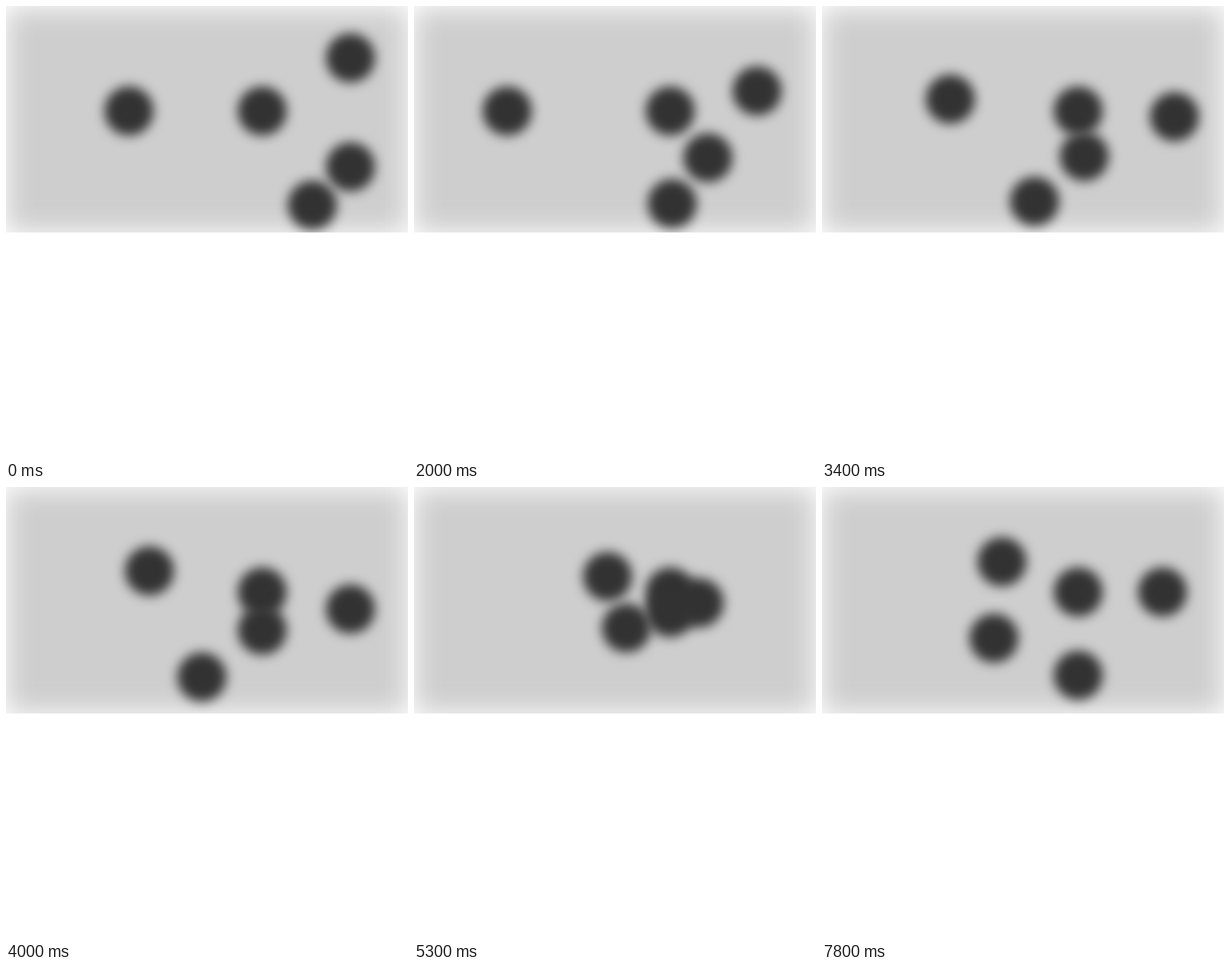
Animation, 706 px wide and 794 px high, one loop 7.9 s. Source, as an HTML page with a canvas:

```html
<!DOCTYPE html>
<html lang="en">
<head>
<meta charset="utf-8">
<title>Drifting blobs</title>
<style>
  html, body { margin: 0; width: 100%; height: 100%; overflow: hidden; background: #fff; }
  canvas { display: block; }
</style>
</head>
<body>
<canvas id="stage" width="706" height="794"></canvas>
<script>
const LOOP = 7900, STEP = 100, W = 706, H = 794, PANEL_H = 397;
const HOME = [450, 184], BURST_END = 7800;
const RADIUS = 43, BLUR = 10, PAD = 80;

const ctx = document.getElementById('stage').getContext('2d');

function layer(w, h, paint) {
  const c = document.createElement('canvas');
  c.width = w;
  c.height = h;
  paint(c.getContext('2d'));
  return c;
}

const panel = layer(W, PANEL_H, g => {
  g.fillStyle = '#fff';
  g.fillRect(0, 0, W, PANEL_H);
  g.filter = 'blur(24px)';
  g.fillStyle = '#cecece';
  g.fillRect(0, 3, W, PANEL_H - 3);
});

const dot = layer(PAD * 2, PAD * 2, g => {
  g.filter = `blur(${BLUR}px)`;
  g.fillStyle = '#323232';
  g.beginPath();
  g.arc(PAD, PAD, RADIUS, 0, Math.PI * 2);
  g.fill();
});

// Each blob leaves its first point at `from`, passes the others at STOPS,
// sinks into the centre at `merge` and is then thrown out by `out`.
const STOPS = [1200, 2800, 3700, 4000, 5300];
const blobs = [
  { from: 0, merge: 6900, out: [-134, -53], swing: 55,
    points: [[216, 184], [216, 184], [216, 184], [234, 152], [252, 147], [340, 157]] },
  { from: 1100, merge: 7455, out: [148, 0],
    points: [[605, 91], [604, 117], [602, 171], [625, 205], [605, 214], [501, 203]] },
  { from: 0, merge: 7455, out: [0, 146],
    points: [[605, 282], [562, 256], [475, 276], [455, 256], [450, 251], [450, 220]] },
  { from: 1100, merge: 6900, out: [-148, 81],
    points: [[538, 349], [517, 349], [407, 343], [358, 342], [344, 333], [373, 247]] }
];
for (const b of blobs) {
  b.times = [b.from, ...STOPS, b.merge];
  b.points.push(HOME);
}

const slope = (b, i, k) =>
  (b.points[i + 1][k] - b.points[i][k]) / (b.times[i + 1] - b.times[i]);

// Monotone tangent: flat at turning points and at the end.
function tangent(b, i, k) {
  if (i === b.times.length - 1) return 0;
  if (i === 0) return slope(b, 0, k);
  const m = slope(b, i - 1, k), n = slope(b, i, k);
  return m * n <= 0 ? 0 : 2 * m * n / (m + n);
}

function along(b, t, k) {
  const { times, points } = b, last = times.length - 1;
  if (t <= times[0]) return points[0][k];
  if (t >= times[last]) return points[last][k];
  const i = times.findIndex(end => t < end) - 1;
  const h = times[i + 1] - times[i], u = (t - times[i]) / h, v = 1 - u;
  return v * v * (1 + 2 * u) * points[i][k] + u * u * (3 - 2 * u) * points[i + 1][k]
    + h * u * v * (v * tangent(b, i, k) - u * tangent(b, i + 1, k));
}

// One sideways sway and back.
function sway(t) {
  const u = (t - 1200) / 1400;
  return u > 0 && u < 1 ? Math.sin(Math.PI * u) ** 2 : 0;
}

function place(b, t) {
  const s = Math.max(0, (t - b.merge) / (BURST_END - b.merge)) ** 0.9;
  return [
    along(b, t, 0) + b.out[0] * s - (b.swing || 0) * sway(t),
    along(b, t, 1) + b.out[1] * s
  ];
}

function drawDot([x, y]) {
  ctx.drawImage(dot, x - PAD, y - PAD);
}

function draw(t) {
  ctx.fillStyle = '#fff';
  ctx.fillRect(0, 0, W, H);
  ctx.drawImage(panel, 0, 0);
  ctx.save();
  ctx.beginPath();
  ctx.rect(0, 0, W, PANEL_H);
  ctx.clip();
  drawDot(HOME);
  for (const b of blobs) drawDot(place(b, t));
  ctx.restore();
}

const start = performance.now();
function tick() {
  const t = (performance.now() - start) % LOOP;
  draw(Math.floor(t / STEP) * STEP);
  requestAnimationFrame(tick);
}
tick();
</script>
</body>
</html>
```
